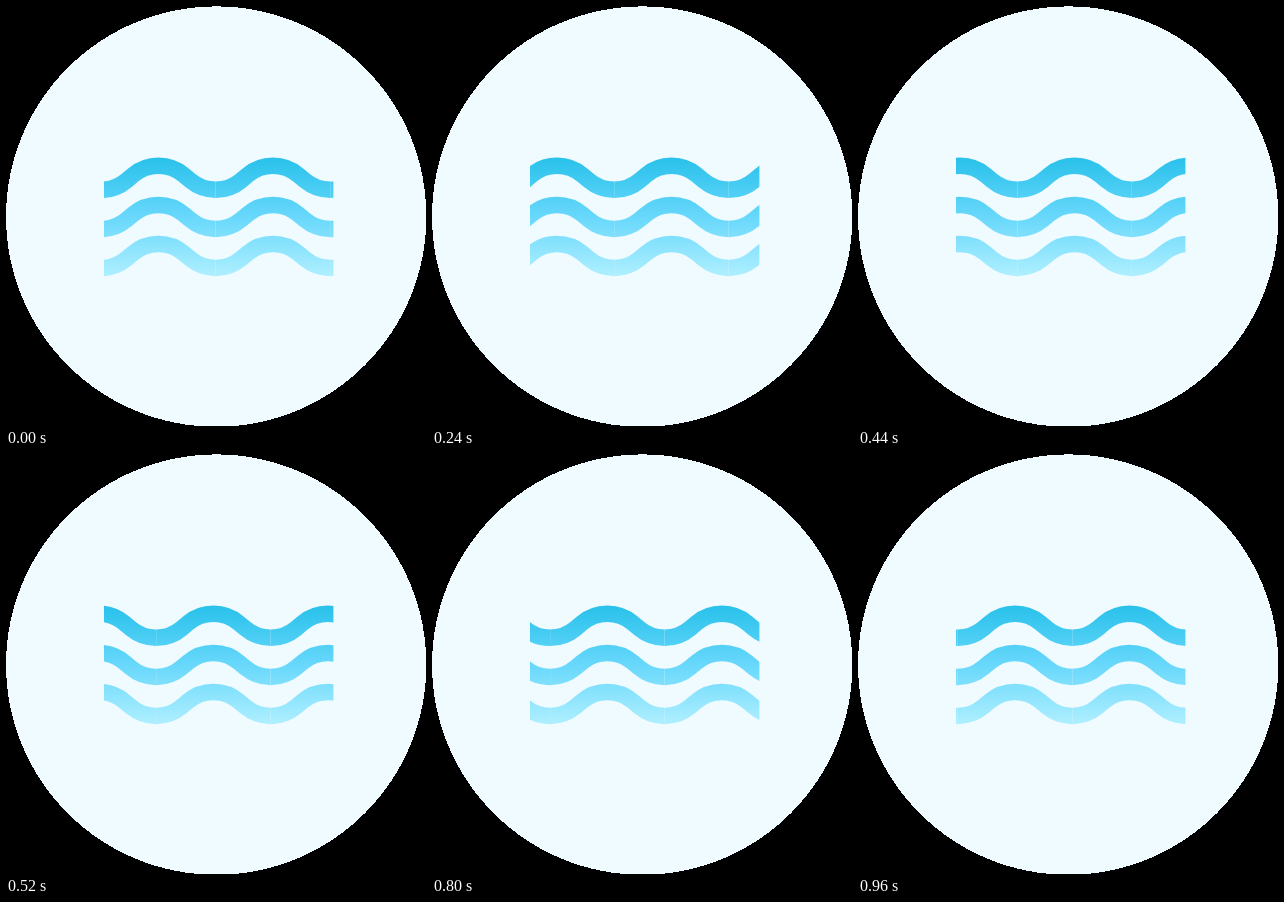
These frames come from a looping animation (420 by 420 pixels, 1 s). An HTML page without scripts:

```html
<!DOCTYPE html>
<html lang="en">
<head>
<meta charset="utf-8">
<title>Waves</title>
<style>
  html, body { margin: 0; width: 100%; height: 100%; overflow: hidden; background: #000; }
  svg { display: block; width: 100%; height: 100%; }
  /* one wavelength per loop, 25 held poses; the small delay keeps samples off step edges */
  .flow { animation: flow 1s steps(25) -2ms infinite; }
  @keyframes flow { to { transform: translateX(-114.5px); } }
</style>
</head>
<body>
<svg viewBox="0 0 420 420">
  <defs>
    <linearGradient id="water" gradientUnits="userSpaceOnUse" x1="0" y1="152" x2="0" y2="270">
      <stop offset="0" stop-color="#29c1eb"/>
      <stop offset=".5" stop-color="#68d8fb"/>
      <stop offset="1" stop-color="#aeefff"/>
    </linearGradient>
    <clipPath id="window"><rect x="98" y="140" width="229.4" height="140"/></clipPath>
    <mask id="waves" maskUnits="userSpaceOnUse" x="0" y="140" width="420" height="140">
      <g class="flow" fill="none" stroke="#fff" stroke-width="16.4">
        <g id="wave">
          <path id="swell" d="M95.2 183.8a39.3 39.3 0 0 0 25.3-9.2l6.65-5.6a39.3 39.3 0 0 1 50.6 0l6.65 5.6a39.3 39.3 0 0 0 25.3 9.2"/>
          <use href="#swell" x="114.5"/>
          <use href="#swell" x="229"/>
          <use href="#swell" x="343.5"/>
        </g>
        <use href="#wave" y="39.2"/>
        <use href="#wave" y="78.2"/>
      </g>
    </mask>
  </defs>
  <circle cx="210.2" cy="210.6" r="210.2" fill="#f0fbff" shape-rendering="crispEdges"/>
  <g clip-path="url(#window)">
    <rect x="98" y="140" width="230" height="140" fill="url(#water)" mask="url(#waves)"/>
  </g>
</svg>
</body>
</html>
```
